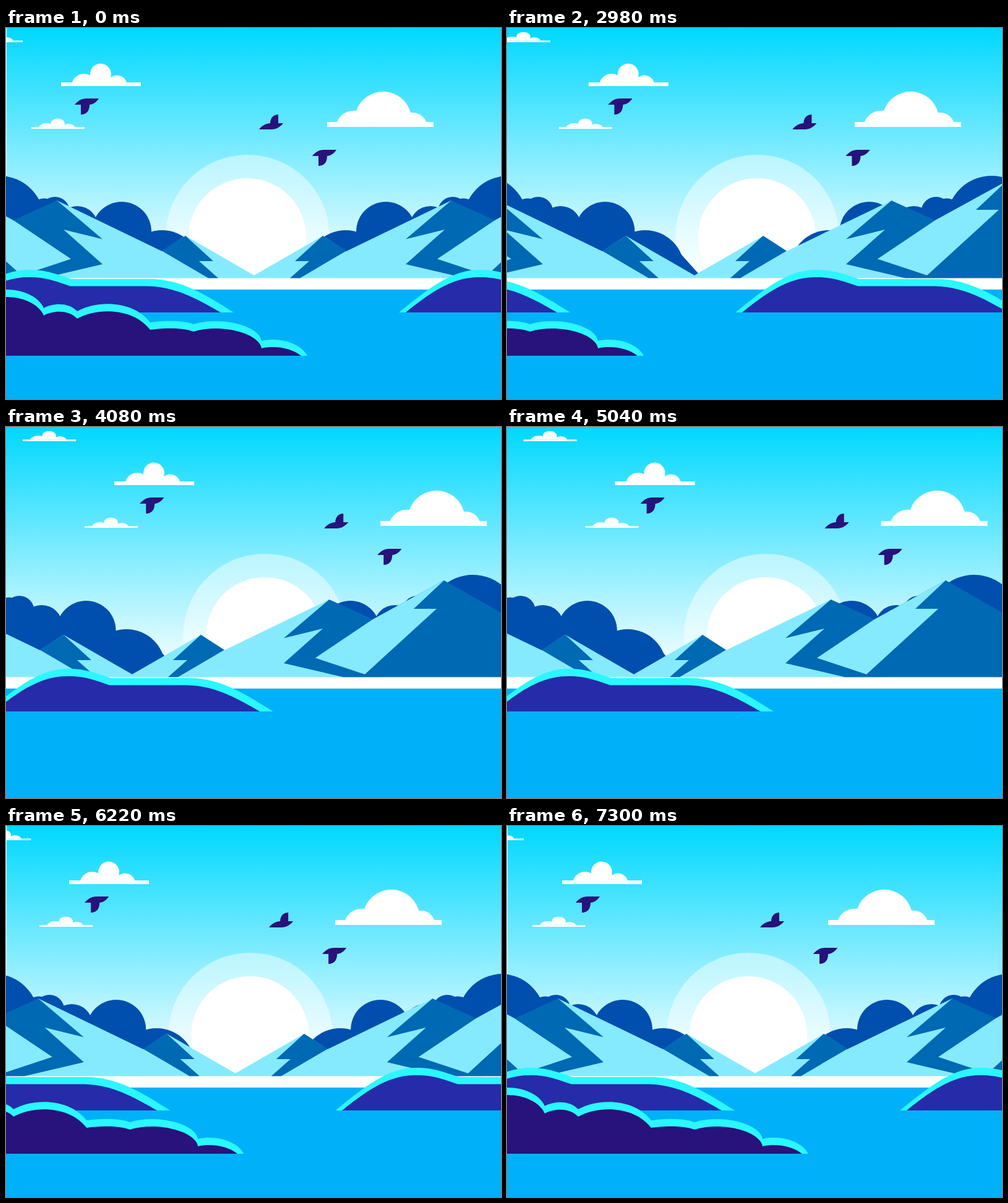
Animation of 800 by 600 pixels, one loop 8.92 s. Source, as an HTML page:

```html
<!DOCTYPE html>
<html lang="en">
<head>
<meta charset="utf-8">
<title>Mountain lake</title>
<style>
  html, body { margin: 0; width: 100%; height: 100%; overflow: hidden; background: #fff; }
  svg { display: block; width: 100%; height: 100%; }
</style>
</head>
<body>
<svg viewBox="0 0 800 600">
  <defs>
    <linearGradient id="sky" gradientUnits="userSpaceOnUse" x1="0" y1="0" x2="0" y2="404">
      <stop offset="0" stop-color="#00d8ff"/>
      <stop offset="1" stop-color="#fff"/>
    </linearGradient>
    <clipPath id="shore"><rect x="-20" y="400" width="540" height="130"/></clipPath>

    <g id="cloud">
      <rect y="-6" width="129" height="6"/>
      <path d="M18-6A20 20 0 0 1 47-17.5A17 17 0 1 1 80-14A16.500 16.500 0 0 1 106-6Z"/>
    </g>
    <g id="bigCloud">
      <rect y="-8" width="172" height="8"/>
      <path d="M16-8A28.500 28.500 0 0 1 47-26A46 46 0 0 1 135-23A23 23 0 0 1 160-8Z"/>
    </g>
    <path id="bird" d="M0 10C5 4 11 0 19 0H39C35 6 30 9.500 24 10C24 19 20 26 10 26V10Z"/>

    <g id="trees" fill="#004faf">
      <circle cx="-11" cy="312" r="73"/>
      <circle cx="62" cy="300" r="24.500"/>
      <circle cx="79" cy="297" r="24"/>
      <circle cx="115" cy="322" r="34"/>
      <circle cx="187" cy="329" r="48"/>
      <circle cx="252" cy="390" r="63"/>
      <path d="M-84 312H62L115 320L187 329H234L252 340L310 366L345 405H-84Z"/>
    </g>

    <g id="range">
      <path fill="#86eaff" d="M401 400L512 336L550 361L719.500 279L800 330V404.400H400.500Z"/>
      <path fill="#0069b4" d="M512 336L550 360.500L475 404.400H459L490 377H467Z"/>
      <path fill="#0069b4" d="M719.500 279L790 311L905 248L1180 404.400H742L646 382L709 326L646 341.500Z"/>
      <path fill="#86eaff" d="M905 248L790 311L697 373.500L777 400L893 294H856Z"/>
    </g>

    <g id="hill">
      <path fill="#2bf7ff" d="M0 460C50 420 85 391 131 391C160 391 178 399 200 406H328C380 406 425 437 462 460Z"/>
      <path fill="#262ba9" d="M11 460C60 420 92 403 131 403C160 403 178 411 198 417.500H322C372 418 412 444 441 460Z"/>
    </g>
    <path id="bush" d="M-20 424L0 423C30 423 54 436 61 453C76 445 100 443 115 458C148 440 205 440 233 476C255 473 285 472 303 479C345 466 408 480 413 506C440 500 475 508 487 530V545H-20Z"/>
  </defs>

  <rect width="800" height="600" fill="url(#sky)"/>
  <rect id="gap" width="1" height="404" fill="#fff"/>

  <g id="sun" fill="#fff">
    <circle cx="390.500" cy="337.500" r="132.500" opacity=".45"/>
    <circle cx="390" cy="338" r="95"/>
  </g>

  <g id="woods">
    <use href="#trees"/>
    <use href="#trees" transform="matrix(-1 0 0 1 801 0)"/>
  </g>

  <g id="clouds" fill="#fff">
    <use href="#cloud" transform="translate(89 94)"/>
    <use href="#bigCloud" transform="translate(519 160)"/>
    <use href="#cloud" transform="translate(41 163) scale(.667 .45)"/>
    <use href="#cloud" transform="translate(-59 23) scale(.667 .45)"/>
  </g>

  <g id="birds" fill="#28127b">
    <use href="#bird" x="111" y="114"/>
    <use href="#bird" x="495" y="197"/>
    <path transform="translate(409 140)" d="M0 24C5 17 12 14.500 18 14C18 6 23 0 31 0V14H39C34 20 28 24 20 24Z"/>
  </g>

  <rect y="404" width="800" height="19" fill="#fff"/>
  <g id="peaks">
    <use href="#range"/>
    <use href="#range" transform="matrix(-1 0 0 1 802 0)"/>
  </g>
  <rect y="423" width="800" height="177" fill="#00b1f9"/>

  <g id="front">
    <use href="#hill" x="-94"/>
    <use href="#hill" x="635"/>
    <g clip-path="url(#shore)">
      <use href="#bush" fill="#2bf7ff"/>
      <use href="#bush" y="12" fill="#28127b"/>
    </g>
  </g>
</svg>
<script>
const LOOP = 8920, GO = 2305, BACK = 4885, SPAN = 2400;
const FRONT_DELAY = 140;
const travel = { sun: 29.5, woods: -60, clouds: 90, birds: 110, peaks: -206, front: -700 };
const $ = id => document.getElementById(id);

// cubic-bezier(.25, .1, .25, 1)
function ease(x) {
  if (x <= 0) return 0;
  if (x >= 1) return 1;
  let lo = 0, hi = 1;
  for (let i = 0; i < 30; i++) {
    const u = (lo + hi) / 2;
    if (0.75 * u * (1 - u) + u ** 3 < x) lo = u; else hi = u;
  }
  const u = lo, v = 1 - u;
  return 0.3 * u * v * v + 3 * u * u * v + u ** 3;
}

// The front layer sets off later but arrives with the others.
function progress(t, delay) {
  if (t >= BACK) return 1 - ease((t - BACK) / SPAN);
  return ease((t - GO - delay) / (SPAN - delay));
}

function draw(t) {
  for (const id in travel) {
    const p = progress(t, id === 'front' ? FRONT_DELAY : 0);
    $(id).setAttribute('transform', `translate(${(travel[id] * p).toFixed(3)} 0)`);
  }
  $('gap').setAttribute('visibility', t > GO + 300 && t < BACK + 300 ? 'hidden' : 'visible');
}

const start = performance.now();
function tick() {
  draw((performance.now() - start) % LOOP);
  requestAnimationFrame(tick);
}
tick();
</script>
</body>
</html>
```
